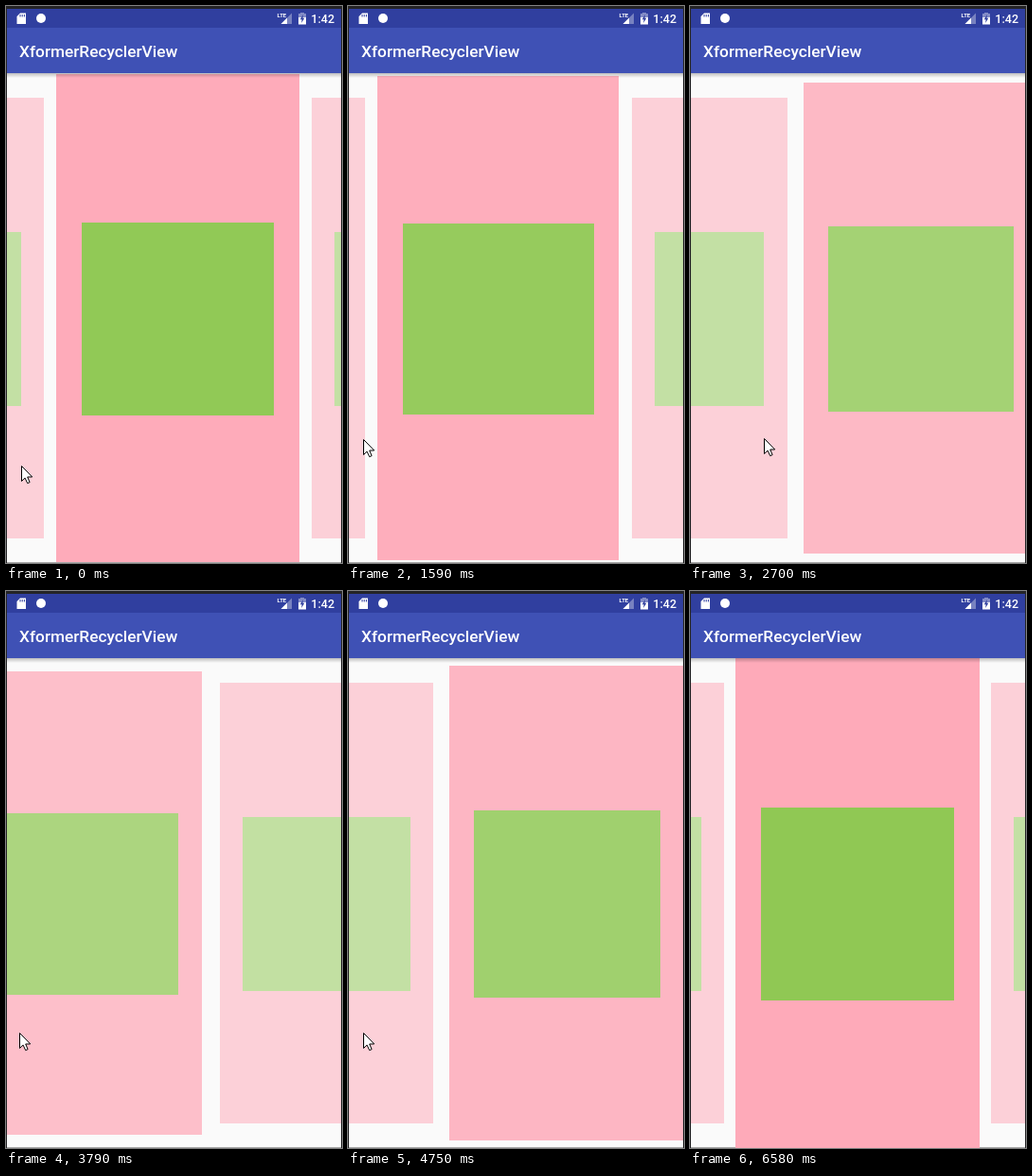
An HTML page with a canvas that plays this animation: 355x589 px, repeating every 7260 ms.

```html
<!DOCTYPE html>
<html lang="en">
<head>
<meta charset="utf-8">
<title>XformerRecyclerView</title>
<style>
  html, body { margin: 0; width: 100%; height: 100%; overflow: hidden; background: #fafafa; }
  canvas { display: block; width: 355px; height: 589px; }
</style>
</head>
<body>
<canvas id="stage" width="355" height="589"></canvas>
<script>
const ctx = document.getElementById('stage').getContext('2d');
const W = 355, H = 589, LOOP = 7260;
const REFRESH = 135, LEAD = 35;
const BAR_BOTTOM = 71, MID_X = 177, MID_Y = 330;
const PITCH = 257, CARD_W = 257.5, CARD_H = 518, ICON = 204;
const PAPER = [250, 250, 250], PINK = [254, 170, 185], GREEN = [144, 200, 84];
const START_X = 4.5, SNAP_TIME = 570;

// Each swipe drags the list by `pull`; after release it snaps to the nearest card.
const swipes = [
  { grab: 0, release: 200, pull: -20 },
  { grab: 420, release: 590, pull: -70 },
  { grab: 1080, release: 1310, pull: -88 },
  { grab: 1860, release: 1960, pull: -40 },
  { grab: 2270, release: 2600, pull: -159 },
  { grab: 3230, release: 3730, pull: -110 },
  { grab: 4300, release: 4575, pull: -157 }
];

const pointerStops = [
  { at: 0, x: 16, y: 486 },
  { at: 1080, x: 221, y: 456 },
  { at: 1310, x: 16, y: 458 },
  { at: 1620, x: 16, y: 458 },
  { at: 2270, x: 221, y: 457 },
  { at: 2700, x: 78, y: 457 },
  { at: 3230, x: 221, y: 462 },
  { at: 3780, x: 14, y: 467 },
  { at: 4300, x: 221, y: 462 },
  { at: 4575, x: 16, y: 467 },
  { at: 5300, x: 16, y: 467 },
  { at: 6430, x: 324, y: 585 }
];
const POINTER_GONE = 6580;

const mix = (a, b, p) => a + (b - a) * p;
const clamp = p => Math.min(1, Math.max(0, p));
const easeOut = (p, power) => 1 - (1 - clamp(p)) ** power;

function scrollAt(t) {
  let x = START_X;
  for (const [i, { grab, release, pull }] of swipes.entries()) {
    if (t < grab) break;
    if (t < release) return mix(x, pull, easeOut((t - grab) / (release - grab), 4));
    const end = Math.min(t, swipes[i + 1]?.grab ?? t);
    const fromNearest = pull - Math.round(pull / PITCH) * PITCH;
    x = mix(fromNearest, 0, easeOut((end - release) / SNAP_TIME, 2));
  }
  return x;
}

function pointerAt(t) {
  const next = pointerStops.findIndex(stop => stop.at > t);
  if (next < 0) return pointerStops.at(-1);
  const a = pointerStops[next - 1], b = pointerStops[next];
  const p = (t - a.at) / (b.at - a.at);
  return { x: Math.round(mix(a.x, b.x, p)), y: Math.round(mix(a.y, b.y, p)) };
}

function rect(x, y, w, h, color) {
  ctx.fillStyle = color;
  ctx.fillRect(x, y, w, h);
}

function centredRect(x, y, w, h, color) {
  const left = Math.round(x - w / 2), top = Math.round(y - h / 2);
  rect(left, top, Math.round(x + w / 2) - left, Math.round(y + h / 2) - top, color);
}

function polygon(points, color) {
  ctx.beginPath();
  points.forEach(([x, y]) => ctx.lineTo(x, y));
  ctx.closePath();
  ctx.fillStyle = color;
  ctx.fill();
}

function text(str, x, y, font, align = 'left') {
  ctx.font = font + ' Roboto, sans-serif';
  ctx.textAlign = align;
  ctx.fillStyle = '#fff';
  ctx.fillText(str, x, y);
}

function overPaper(color, alpha) {
  return `rgb(${color.map((c, i) => Math.round(mix(PAPER[i], c, alpha)))})`;
}

// Cards shrink and fade with their distance from the middle.
function drawCard(x) {
  const shrink = Math.min(0.1, Math.abs(x - MID_X) / 1680);
  const scale = 1 - shrink, alpha = 1 - shrink * 4.8;
  centredRect(x, MID_Y, CARD_W * scale, CARD_H * scale, overPaper(PINK, alpha));
  centredRect(x, MID_Y + scale, ICON * scale, ICON * scale, overPaper(GREEN, alpha));
}

function drawList(t) {
  rect(0, BAR_BOTTOM, W, H - BAR_BOTTOM, overPaper(PAPER, 1));
  rect(0, H - 1, W, 1, '#a8a8a8');
  const x = MID_X + scrollAt(t);
  for (let i = -2; i <= 2; i++) drawCard(x + i * PITCH);

  const shade = ctx.createLinearGradient(0, BAR_BOTTOM, 0, BAR_BOTTOM + 5);
  shade.addColorStop(0, 'rgba(0,0,0,.24)');
  shade.addColorStop(1, 'rgba(0,0,0,0)');
  rect(0, BAR_BOTTOM, W, 5, shade);
}

function drawStatusIcons() {
  // memory card
  polygon([[15, 7.5], [21, 7.5], [21, 19], [11.5, 19], [11.5, 11]], '#fff');
  for (let i = 0; i < 3; i++) rect(14.5 + i * 2.2, 9, 1, 2.5, '#303f9f');

  // notification
  ctx.beginPath();
  ctx.arc(37, 13, 5, 0, Math.PI * 2);
  ctx.fillStyle = '#fff';
  ctx.fill();

  // mobile signal
  polygon([[302, 7.5], [302, 19], [290.5, 19]], 'rgba(255,255,255,.35)');
  polygon([[297, 12.5], [297, 19], [290.5, 19]], '#fff');
  text('LTE', 286.5, 11.5, '700 6px');

  // charging battery
  rect(311, 7, 4, 1, 'rgba(255,255,255,.4)');
  rect(309, 8, 8, 4, 'rgba(255,255,255,.4)');
  rect(309, 12, 8, 7.5, '#fff');
  polygon([[313.8, 9], [310.8, 14.2], [312.6, 14.2], [312.2, 18], [315.3, 12.8], [313.5, 12.8]], '#303f9f');
}

function drawBars() {
  rect(0, 0, W, 3, '#242426');
  rect(0, 3, W, 20, '#303f9f');
  rect(0, 23, W, BAR_BOTTOM - 23, '#3f51b5');
  drawStatusIcons();
  text('1:42', 347, 18, '500 12.5px', 'right');
  text('XformerRecyclerView', 14, 54, '500 17.3px');
}

function drawPointer(t) {
  if (t >= POINTER_GONE) return;
  const { x, y } = pointerAt(t);
  ctx.save();
  ctx.translate(x + 0.5, y + 0.5);
  polygon([[0, 0], [0, 16], [3.6, 12.6], [6.2, 18.2], [8.6, 17.1], [6.2, 11.5], [11.2, 11.5]], '#fff');
  ctx.strokeStyle = '#000';
  ctx.lineWidth = 1;
  ctx.stroke();
  ctx.restore();
}

function draw(now) {
  const t = Math.floor((now % LOOP + LEAD) / REFRESH) * REFRESH;
  drawList(t);
  drawBars();
  drawPointer(t);
  rect(0, 0, 1, H, '#242426');
  rect(W - 1, 0, 1, H, '#242426');
}

let origin;
function frame(now) {
  origin ??= now;
  draw(now - origin);
  requestAnimationFrame(frame);
}
draw(0);
requestAnimationFrame(frame);
</script>
</body>
</html>
```
